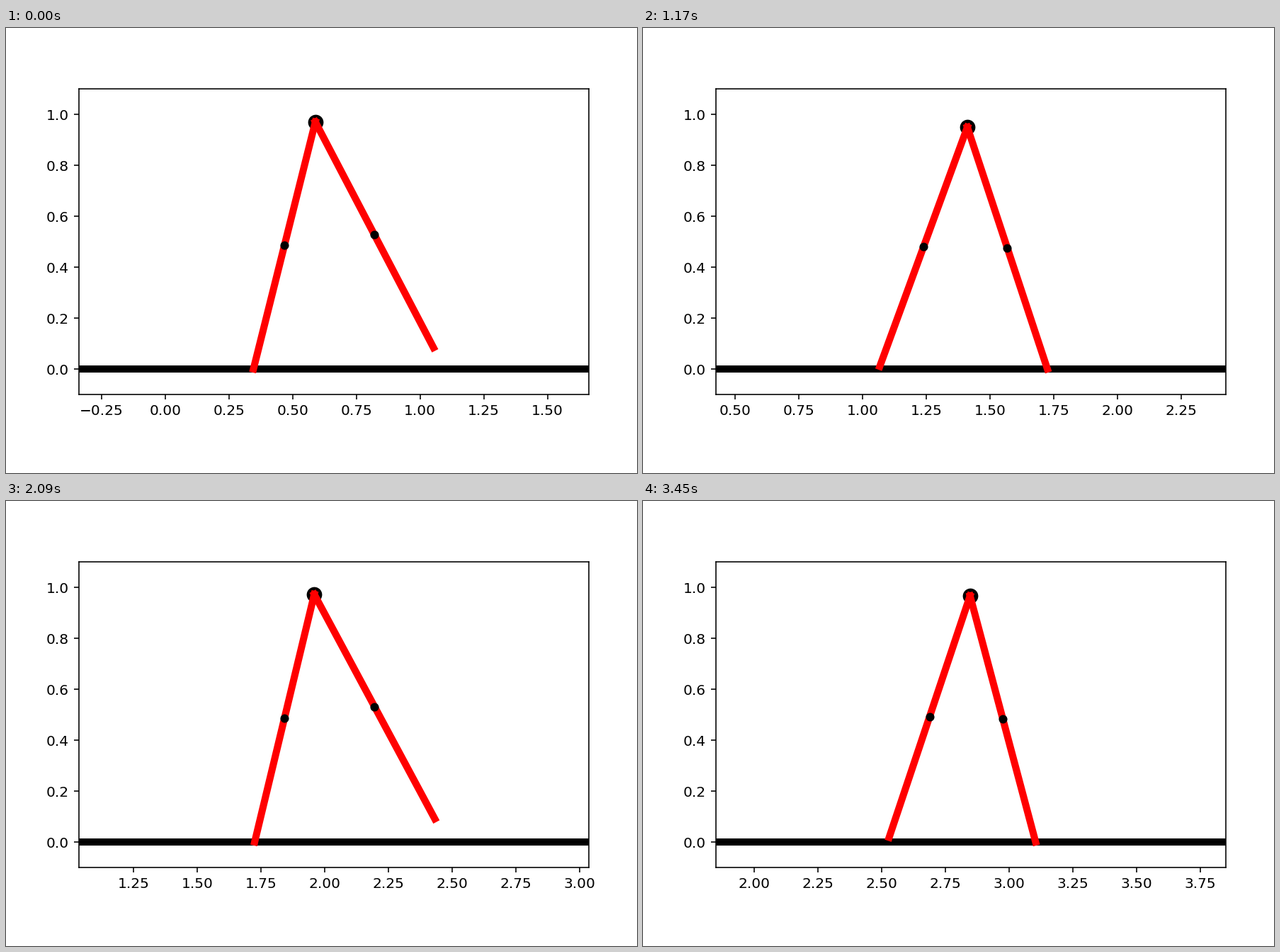
A matplotlib script that plays this animation: 891 px wide and 629 px high, repeating every 3550 ms.

```python
import numpy as np
import matplotlib.pyplot as plt
from matplotlib.animation import FuncAnimation
from matplotlib.ticker import MultipleLocator

W, H, DPI = 891, 629, 145
LOOP_MS, TICK_MS = 3550, 10

# Playback stutters: a pose stays 20 ms, but 22 pauses last 100 ms,
# spread evenly between a few fixed poses.
POSES = 87
pauses = np.interp(range(22), [0, 2, 3, 6, 9, 12, 14, 16, 20, 21],
                   [0, 11, 15, 29, 47, 57, 63, 72, 84, 86])
hold = np.full(POSES, 20)
hold[25:50:6] = 30
hold[np.round(pauses).astype(int)] = 100
starts = np.cumsum(hold) - hold

# One step of the gait: smooth curves through a few leg angles in degrees.
PERIOD, STRIKE = 27.1, 2.1
STEP, FIRST_FOOT = 0.6895, 0.3465
VIEW_START, VIEW_SPEED = 0.662, 0.02545
KEYS = np.array([0, 2.6, 8.9, 17.8, 25, PERIOD]) / PERIOD
STANCE = np.polyfit(KEYS, [-20.15, -14.9, -8.15, 0, 14.05, 20.15], 5)
SWING = np.polyfit(KEYS, [-20.15, -18.5, 0.5, 32.5, 27.6, 20.15], 5)


def walker(pose):
    """Return hip, stance foot and swing foot positions."""
    step, phase = divmod((pose - STRIKE) / PERIOD, 1)
    a = np.radians(np.polyval(STANCE, phase))
    b = np.radians(np.polyval(SWING, phase))
    foot = np.array([FIRST_FOOT + STEP * (step + 1), 0.0])
    hip = foot + [np.sin(a), np.cos(a)]
    return hip, foot, hip + [np.sin(b), -np.cos(b)]


fig = plt.figure(figsize=((W + 0.01) / DPI, (H + 0.01) / DPI), dpi=DPI,
                 facecolor="white")
ax = fig.add_axes([103 / W, 111 / H, 720 / W, 432 / H])
ax.set_ylim(-0.1, 1.1)
ax.set_yticks(np.arange(0, 1.1, 0.2))
ax.xaxis.set_major_locator(MultipleLocator(0.25))

ax.plot([-5, 10], [0, 0], color="black", lw=5)
hip_dot, = ax.plot([], [], "o", color="black", ms=10.8, mew=0)
legs = [ax.plot([], [], color="red", lw=5)[0] for _ in range(2)]
mass_dots, = ax.plot([], [], "o", color="black", ms=6, mew=0)


def update(frame):
    pose = np.searchsorted(starts, frame * TICK_MS, side="right") - 1
    hip, *feet = walker(pose)
    hip_dot.set_data([hip[0]], [hip[1]])
    for leg, foot in zip(legs, feet):
        leg.set_data([hip[0], foot[0]], [hip[1], foot[1]])
    mass_dots.set_data(*np.transpose([(hip + foot) / 2 for foot in feet]))
    center = VIEW_START + VIEW_SPEED * pose
    ax.set_xlim(center - 1, center + 1)
    return [hip_dot, *legs, mass_dots]


anim = FuncAnimation(fig, update, frames=LOOP_MS // TICK_MS,
                     interval=TICK_MS, repeat=True, repeat_delay=0)
plt.show()
```
